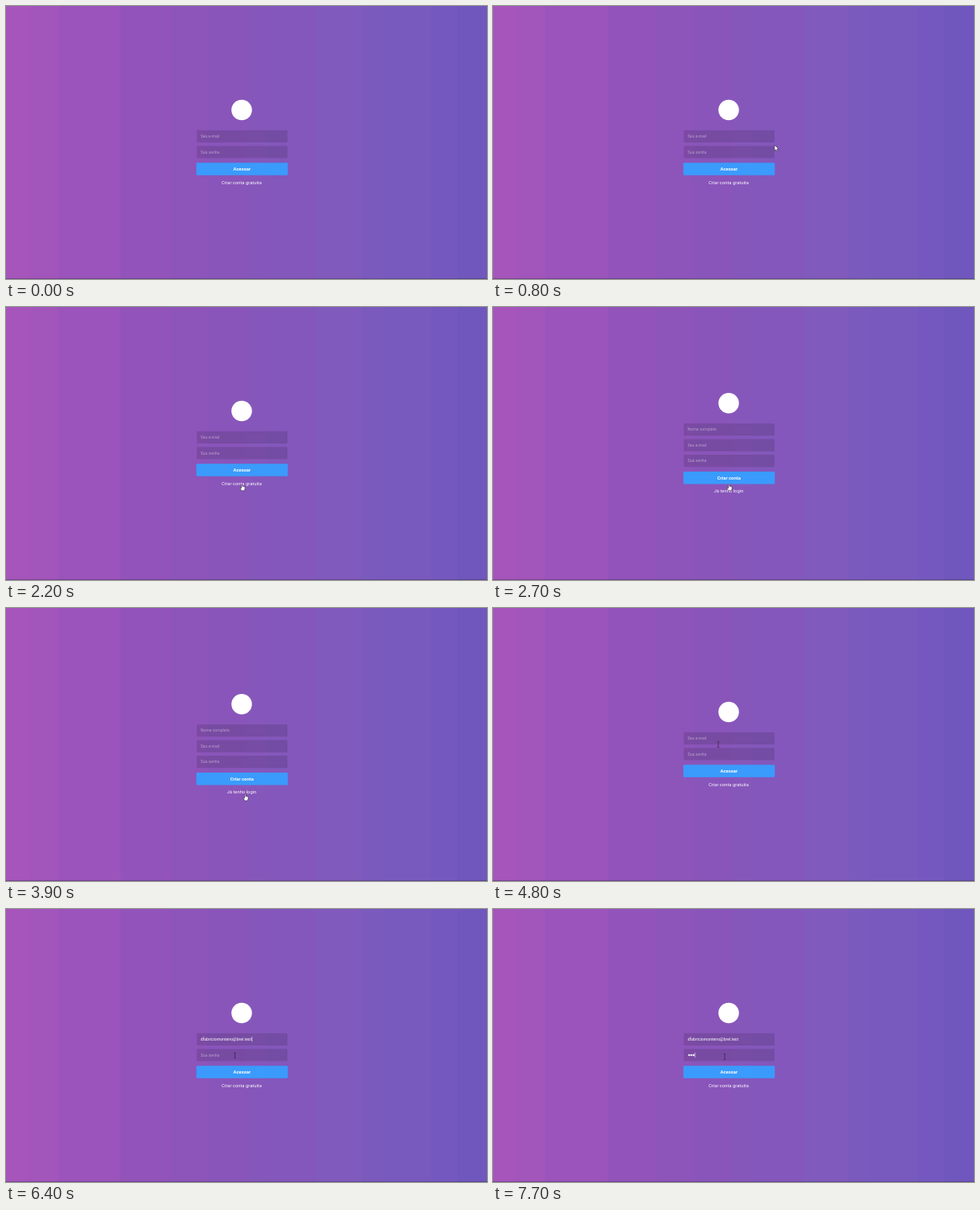
Recreate the animation shown at these times as an HTML page. Size 600 px wide and 340 px high, loop 8000 ms.

```html
<!DOCTYPE html>
<html lang="pt">
<head>
<meta charset="utf-8">
<title>Login</title>
<style>
  html, body { margin: 0; width: 100%; height: 100%; overflow: hidden; background: #8856ba; }
  svg { display: block; width: 100vw; height: 100vh; }
  text { font-family: Roboto, Arial, sans-serif; font-size: 5.1px; fill: #fff; }
  .hint { fill-opacity: .45; }
  .action { font-size: 5.9px; font-weight: 700; text-anchor: middle; }
  .link { font-size: 5.85px; text-anchor: middle; fill-opacity: .95; }
  .list text { font-family: "Open Sans", sans-serif; font-size: 4.1px; fill: #111; }
</style>
</head>
<body>
<svg id="stage" viewBox="0 0 600 340" xmlns="http://www.w3.org/2000/svg"></svg>
<script>
const LOOP = 8000, STEP = 100;
const stage = document.getElementById('stage');

function add(parent, tag, attrs = {}, text = '') {
  const el = document.createElementNS('http://www.w3.org/2000/svg', tag);
  for (const name in attrs) el.setAttribute(name, attrs[name]);
  el.textContent = text;
  parent.append(el);
  return el;
}

const group = (parent, attrs) => add(parent, 'g', attrs);
const rect = (parent, x, y, width, height, fill, more = {}) =>
  add(parent, 'rect', { x, y, width, height, fill, ...more });
const label = (parent, x, y, cls, text) => add(parent, 'text', { x, y, class: cls }, text);
const show = (el, on) => el.setAttribute('visibility', on ? 'inherit' : 'hidden');

// Background: vertical bands, left edge and colour
const bands = [
  [0, '#a655bb'], [30, '#a255bb'], [65, '#9b54bb'], [143, '#9253ba'],
  [205, '#8d54ba'], [250, '#8955ba'], [300, '#8657bb'], [325, '#8357bb'],
  [387, '#805abc'], [443, '#7b5abe'], [470, '#785abf'], [530, '#7558bf'], [563, '#6f57bd']
];
bands.forEach(([x, fill], i) => {
  const end = i + 1 < bands.length ? bands[i + 1][0] : 600;
  rect(stage, x, 0, end - x, 340, fill);
});
rect(stage, 0, 339, 600, 1, '#40305c', { opacity: .45 });

function makeForm(top, hints, action, link) {
  const form = group(stage);
  add(form, 'circle', { cx: 294, cy: top - 25.3, r: 12.8, fill: '#fff' });
  const texts = hints.map((hint, i) => {
    const y = top + i * 19.5;
    rect(form, 238, y, 113, 15.3, '#000', { opacity: .12, rx: .8 });
    return label(form, 242.7, y + 9.2, 'hint', hint);
  });
  const y = top + hints.length * 19.5 + 1.4;
  rect(form, 237.5, y, 114, 15.6, '#3a9bfd', { rx: 1 });
  label(form, 294.3, y + 9.6, 'action', action);
  label(form, 294, y + 26.4, 'link', link);
  return { form, texts };
}

const login = makeForm(154.8, ['Seu e-mail', 'Sua senha'], 'Acessar', 'Criar conta gratuita');
const signup = makeForm(145, ['Nome completo', 'Seu e-mail', 'Sua senha'], 'Criar conta', 'Já tenho login');

const user = 'dfabriciomonteiro';
const mails = [user + '@brel.test', user + '@brumel.test'];
const email = label(stage, 242.7, 164, '', mails[0]);
const dots = [0, 1, 2].map(i =>
  add(stage, 'circle', { cx: 244.6 + i * 2.8, cy: 182, r: 1.15, fill: '#fff' }));
const caret = rect(stage, 0, 0, .6, 6, '#fff');

const list = group(stage, { class: 'list' });
rect(list, 237.7, 170.3, 113.4, 14.8, '#fff', { stroke: '#777', 'stroke-width': .6 });
const row = rect(list, 238, 170.6, 112.8, 7.2, '#e4e4e4');
mails.forEach((mail, i) => label(list, 239.8, 175.6 + i * 7.2, '', mail));

const pointer = group(stage);
const line = { stroke: '#26202e', 'stroke-width': .55, 'stroke-linejoin': 'round' };
const shapes = {
  arrow: add(pointer, 'path', {
    d: 'M0 0V7.2L1.7 5.7L2.8 8.2L4 7.7L2.9 5.2H5.1Z', fill: '#fff', ...line }),
  hand: add(pointer, 'path', {
    d: 'M.7 .8Q1.3-.2 1.9 .8V3L3 2.9L4 3.2L5.1 3.7V6L4.3 8.5H1L-.9 5.6Q-1.2 4.3 0 4.8L.7 5.4Z',
    fill: '#fff', ...line }),
  beam: add(pointer, 'path', {
    d: 'M-1.3-3.5H-.4L0-3.1L.4-3.5H1.3M0-3.1V3.1M-1.3 3.5H-.4L0 3.1L.4 3.5H1.3',
    fill: 'none', stroke: '#2c2138', 'stroke-width': .65 })
};

// Pointer path: time, x, y, shape from that time on
const path = [
  [300, 487, 201, 'arrow'], [900, 324, 167.5, 'arrow'], [1400, 324, 167.5, 'arrow'],
  [1800, 270.5, 195, 'arrow'], [2000, 292, 222, 'hand'], [2200, 293, 220.3, 'hand'],
  [3300, 293, 220.3, 'hand'], [3700, 296.5, 231.3, 'hand'], [3900, 297, 231.5, 'hand'],
  [4400, 297, 231.5, 'hand'], [4500, 294, 215, 'arrow'], [4700, 283, 178, 'beam'],
  [4800, 281, 170, 'beam'], [4900, 280, 167, 'beam'], [5000, 280, 167, 'beam'],
  [5300, 268, 163, 'beam'], [5400, 269, 169, 'beam'], [5500, 270.5, 171.7, 'arrow'],
  [5900, 270.5, 173, 'arrow'], [6000, 272, 176, 'beam'], [6500, 289, 184, 'beam'],
  [LOOP, 289, 184, 'beam']
];

function movePointer(t) {
  show(pointer, t >= path[0][0]);
  if (t < path[0][0]) return;
  const i = path.findIndex(key => key[0] > t) - 1;
  const [t0, x0, y0, kind] = path[i], [t1, x1, y1] = path[i + 1];
  const k = (t - t0) / (t1 - t0);
  pointer.setAttribute('transform', `translate(${x0 + (x1 - x0) * k} ${y0 + (y1 - y0) * k})`);
  for (const name in shapes) show(shapes[name], name === kind);
}

function draw(time) {
  const t = Math.floor(time % LOOP / STEP) * STEP;
  const joining = t >= 2700 && t < 4400;
  const filled = t >= 5900;
  const typed = [7200, 7400, 7700].filter(at => t >= at).length;
  show(login.form, !joining);
  show(signup.form, joining);
  show(login.texts[0], !joining && !filled);
  show(login.texts[1], !joining && !typed);
  show(email, filled);
  show(list, t >= 5400 && !filled);
  show(row, t >= 5500 && !filled);
  dots.forEach((dot, i) => show(dot, i < typed));

  const inMail = t >= 5300 && t < 6500;
  const inPass = t >= 6600 && (t < 7000 || typed > 0);
  show(caret, inMail || inPass);
  caret.setAttribute('x', inMail ? (filled ? 306.6 : 242.6) : 242.8 + typed * 2.95);
  caret.setAttribute('y', inMail ? 159.2 : 178.8);
  movePointer(t);
}

function tick() {
  draw(performance.now());
  requestAnimationFrame(tick);
}
tick();
</script>
</body>
</html>
```
